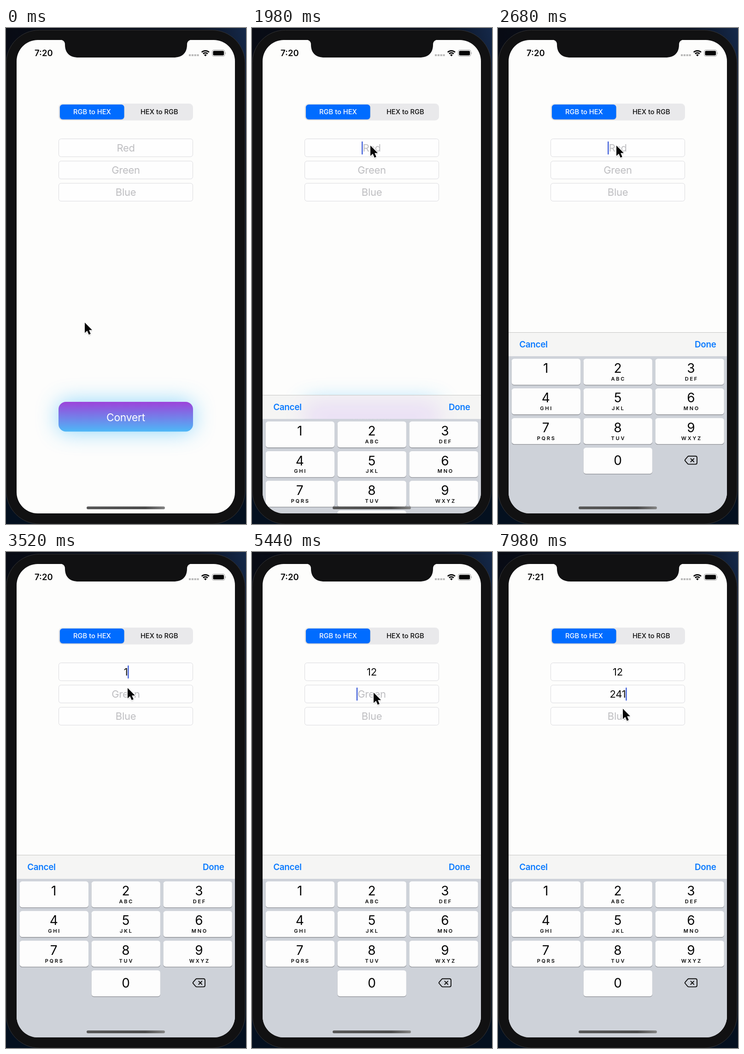
An HTML page for the animation above (8 s loop, 521 px wide and 1076 px high).

```html
<!DOCTYPE html>
<html lang="en">
<head>
<meta charset="utf-8">
<title>Colour converter</title>
<style>
  html, body { margin: 0; width: 100%; height: 100%; overflow: hidden; background: #0a0f1a; }
  svg { display: block; width: 100vw; height: 100vh; }
  text { font-family: Inter, Roboto, sans-serif; text-anchor: middle; }
  .clock { font-size: 18.4px; font-weight: 600; fill: #080808; }
  .seg { font-size: 14.7px; font-weight: 500; fill: #0c0c0c; }
  .seg.on { fill: #fff; }
  .field { fill: #fefefe; stroke: #dadade; }
  .value { font-size: 22px; letter-spacing: -.3px; fill: #0c0c0c; }
  .hint { fill: #bebec1; }
  .convert { font-size: 22.8px; letter-spacing: -.2px; fill: #fff; }
  .bar { font-size: 18.8px; font-weight: 600; letter-spacing: -.25px; fill: #0a7aff; }
  .digit { font-size: 28px; fill: #060606; }
  .letters { font-size: 11px; font-weight: 600; letter-spacing: 2.8px; fill: #060606; }
  .icon { fill: none; stroke: #111; stroke-width: 1.9; stroke-linejoin: round; stroke-linecap: round; }
</style>
</head>
<body>
<svg viewBox="0 0 521 1076" preserveAspectRatio="none">
  <defs>
    <linearGradient id="desk" x2="1">
      <stop offset="0" stop-color="#080b14"/>
      <stop offset=".8" stop-color="#0a1120"/>
      <stop offset="1" stop-color="#15294a"/>
    </linearGradient>
    <linearGradient id="deskFade" x2="0" y2="1">
      <stop offset="0" stop-color="#050c18" stop-opacity="0"/>
      <stop offset=".3" stop-color="#050c18" stop-opacity=".8"/>
      <stop offset="1" stop-color="#04101f"/>
    </linearGradient>
    <linearGradient id="violet" x2="0" y2="1">
      <stop offset="0" stop-color="#9d43da"/>
      <stop offset="1" stop-color="#4db8f7"/>
    </linearGradient>
    <linearGradient id="homeFill" x2="1">
      <stop offset="0" stop-color="#585858"/>
      <stop offset=".75" stop-color="#4c4c4c"/>
      <stop offset="1" stop-color="#858585"/>
    </linearGradient>
    <filter id="glow" x="-40%" y="-150%" width="180%" height="400%"><feGaussianBlur stdDeviation="24"/></filter>
    <filter id="soft" x="-50%" y="-50%" width="200%" height="200%"><feGaussianBlur stdDeviation="1.6"/></filter>
    <clipPath id="screen"><rect x="23" y="26" width="474" height="1027" rx="46"/></clipPath>
    <clipPath id="barClip"><rect x="23" width="474" height="52"/></clipPath>
    <rect id="button" x="114" y="811" width="292" height="64.5" rx="16"/>
    <path id="arrow" d="M0 0V22.6L5.2 17.7L8.9 26.3L12.8 24.6L9.2 16.2H16Z"/>
  </defs>

  <rect width="521" height="1076" fill="url(#desk)"/>
  <rect width="521" height="1076" fill="url(#deskFade)"/>
  <rect x=".5" y="4.5" width="518.5" height="1071.5" rx="72" fill="#111112" stroke="#343436"/>

  <g clip-path="url(#screen)">
    <rect x="23" y="26" width="474" height="1027" fill="#fdfdfc"/>

    <rect x="114" y="164" width="292" height="36.5" rx="8.5" fill="#e9e9eb"/>
    <rect x="116" y="166.5" width="141.5" height="33" rx="7" fill="#00000018"/>
    <rect x="117" y="166" width="139.5" height="32.3" rx="6.2" fill="#006cff"/>
    <text class="seg on" x="187" y="187.3">RGB to HEX</text>
    <text class="seg" x="332.8" y="187.3">HEX to RGB</text>

    <g id="fields"></g>
    <rect id="caret" width="2.4" height="28.5" rx="1.2" fill="#405fd9"/>

    <use href="#button" fill="#45bdfb" opacity=".62" filter="url(#glow)"/>
    <use href="#button" fill="url(#violet)"/>
    <text class="convert" x="260" y="852.5">Convert</text>

    <g id="keyboard">
      <rect x="23" y="52" width="474" height="350" fill="#ced2d9"/>
      <rect x="23" width="474" height="52" fill="#f5f5f4"/>
      <g clip-path="url(#barClip)">
        <use id="tint" href="#button" fill="#a050ff" opacity=".13" filter="url(#glow)"/>
      </g>
      <path d="M23 .5H497" stroke="#c6c6c4"/>
      <text class="bar" x="77" y="32.7">Cancel</text>
      <text class="bar" x="450.3" y="32.7">Done</text>
      <g id="keys"></g>
      <path class="icon" d="M414.2 268.8H428.6Q432 268.8 432 272.2V283Q432 286.4 428.6 286.4H414.2Q412.8 286.4 411.8 285.3L406.4 279Q405.2 277.6 406.4 276.2L411.8 269.9Q412.8 268.8 414.2 268.8ZM418.4 274.2L425.2 281M425.2 274.2L418.4 281"/>
    </g>

    <path d="M116 25Q128 26 128 36C128 54 138 64 158 64H363C383 64 393 54 393 36Q393 26 405 25Z" fill="#111112"/>
    <text class="clock" id="clock" x="81.8" y="61.3"></text>
    <path d="M397 59H419" stroke="#b9b9b9" stroke-width="4" stroke-dasharray="4.2 1.6"/>
    <g fill="none" stroke="#080808" stroke-width="2.7">
      <path d="M424.8 52.6A11.6 11.6 0 0 1 440.9 52.6M427.9 56A7 7 0 0 1 437.8 56"/>
      <path d="M432.85 61.4L430 58.4A4.2 4.2 0 0 1 435.7 58.4Z" fill="#080808" stroke="none"/>
    </g>
    <rect x="447.5" y="47.5" width="27.5" height="14" rx="4" fill="none" stroke="#a0a0a0"/>
    <rect x="449.4" y="49.4" width="23.7" height="10.2" rx="2.4" fill="#050505"/>
    <path d="M476.3 52.2Q478.4 54.5 476.3 56.8Z" fill="#a0a0a0"/>
    <rect x="175" y="1038" width="170" height="6" rx="3" fill="url(#homeFill)"/>
  </g>

  <g id="pointer">
    <use href="#arrow" y="2" fill="#000" opacity=".4" filter="url(#soft)"/>
    <use href="#arrow" fill="#050505" stroke="#fff" stroke-width="3" paint-order="stroke" stroke-linejoin="round"/>
  </g>
</svg>

<script>
const LOOP = 8000, DOCKED = 657, HIDDEN = 1053;
const $ = id => document.getElementById(id);

function add(parent, tag, attrs, text = '') {
  const el = document.createElementNS('http://www.w3.org/2000/svg', tag);
  for (const name in attrs) el.setAttribute(name, attrs[name]);
  el.textContent = text;
  return parent.appendChild(el);
}

// Input fields: placeholder, then [time, typed text]
const fields = [
  { hint: 'Red', typed: [[3400, '1'], [3900, '12']] },
  { hint: 'Green', typed: [[6050, '2'], [6550, '24'], [7050, '241']] },
  { hint: 'Blue', typed: [] }
];
fields.forEach((field, i) => {
  const y = 240.5 + i * 48.2;
  add($('fields'), 'rect', { class: 'field', x: 114.5, y, width: 291, height: 38.7, rx: 5 });
  field.label = add($('fields'), 'text', { x: 260, y: y + 27.5 });
});

// Number pad
const letters = ['', 'ABC', 'DEF', 'GHI', 'JKL', 'MNO', 'PQRS', 'TUV', 'WXYZ'];
const centres = [103.8, 260, 419];
function addKey(col, row, digit, caption) {
  const x = 29.7 + col * 155.9, y = 57.5 + row * 64.35;
  const box = { x, width: 149.3, height: 56.5, rx: 5.5 };
  add($('keys'), 'rect', { ...box, y: y + 1.3, fill: '#8c8e94' });
  add($('keys'), 'rect', { ...box, y, fill: '#fdfdfd' });
  add($('keys'), 'text', { class: 'digit', x: centres[col], y: y + (digit ? 30.6 : 37.5) }, digit);
  add($('keys'), 'text', { class: 'letters', x: centres[col] + 1.4, y: y + 47.4 }, caption);
}
letters.forEach((caption, i) => addKey(i % 3, Math.floor(i / 3), i + 1, caption));
addKey(1, 3, 0, '');

// Pointer stops: time, x, y
const stops = [
  [0, 171, 639], [60, 171, 639], [900, 257, 255], [2900, 257, 255], [3350, 264, 295],
  [4300, 264, 295], [4700, 264, 305], [7200, 264, 305], [7850, 271, 340], [LOOP, 271, 340]
];

// Caret spans: from, to, x, y
const carets = [
  [1660, 3400, 238, 246], [3400, 3900, 264.2, 246], [3900, 4350, 272.2, 246],
  [4950, 6050, 226.8, 294], [6050, 6550, 266.8, 294], [6550, 7050, 273.4, 294],
  [7050, LOOP, 277.2, 294]
];

function pointerAt(t) {
  const i = stops.findIndex(stop => stop[0] > t);
  const [t0, x0, y0] = stops[i - 1], [t1, x1, y1] = stops[i];
  const u = (t - t0) / (t1 - t0), k = u * u * (3 - 2 * u);
  return [x0 + (x1 - x0) * k, y0 + (y1 - y0) * k];
}

// Critically damped slide
function keyboardAt(t) {
  const s = Math.max(0, t - 1654) * 0.00677;
  return DOCKED + (HIDDEN - DOCKED) * (1 + s) * Math.exp(-s);
}

function draw(t) {
  $('clock').textContent = t < 6700 ? '7:20' : '7:21';
  for (const { hint, typed, label } of fields) {
    const last = typed.filter(([at]) => at <= t).pop();
    label.textContent = last ? last[1] : hint;
    label.setAttribute('class', last ? 'value' : 'value hint');
  }

  const caret = carets.find(([from, to]) => t >= from && t < to);
  $('caret').setAttribute('opacity', caret ? 1 : 0);
  if (caret) {
    $('caret').setAttribute('x', caret[2]);
    $('caret').setAttribute('y', caret[3]);
  }

  const y = keyboardAt(t);
  $('keyboard').setAttribute('transform', `translate(0 ${y})`);
  $('tint').setAttribute('transform', `translate(0 ${-y})`);
  $('pointer').setAttribute('transform', `translate(${pointerAt(t)})`);
}

const start = performance.now();
function tick() {
  draw((performance.now() - start) % LOOP);
  requestAnimationFrame(tick);
}
tick();
</script>
</body>
</html>
```
